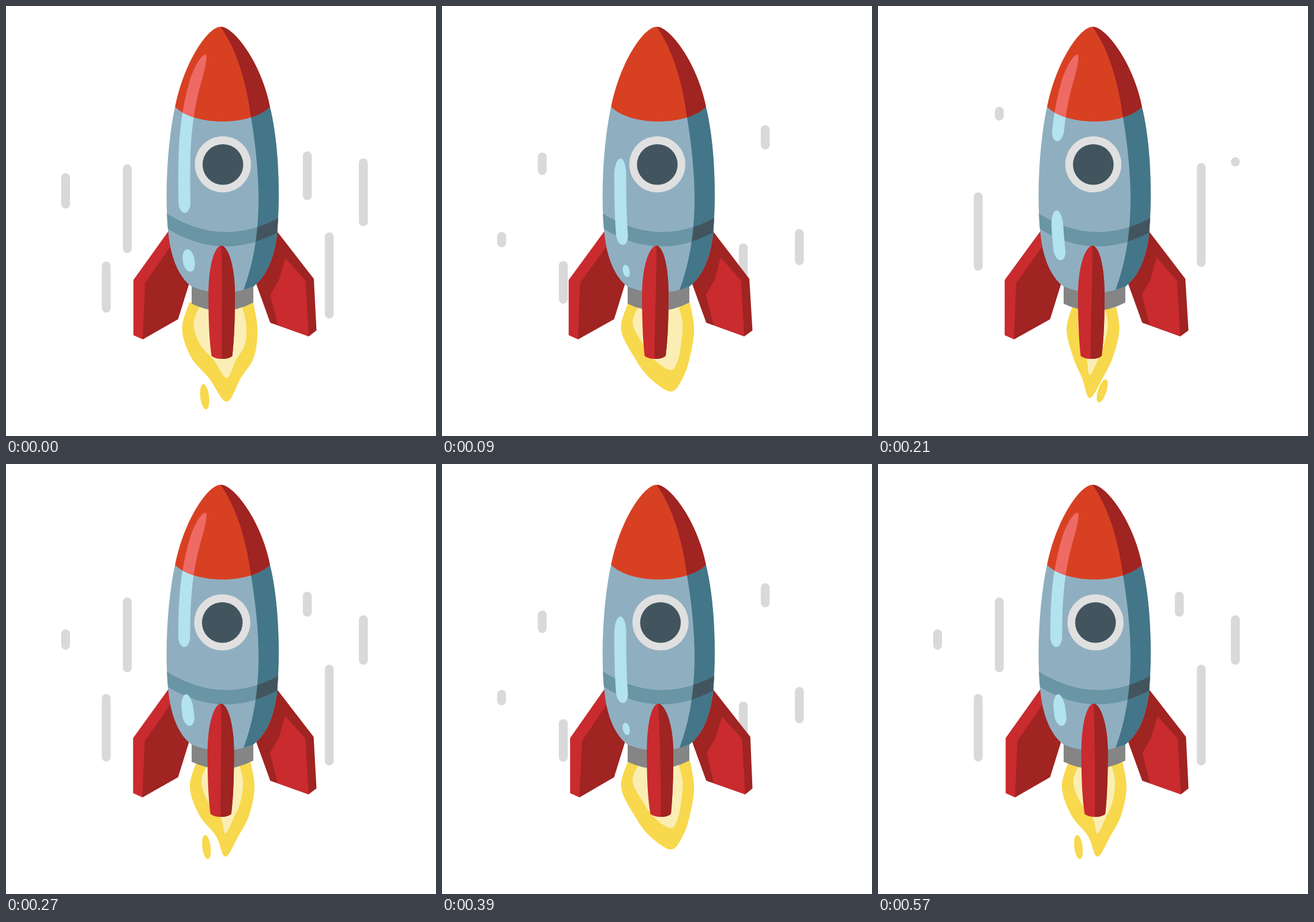
Animation of 725x725 px, one loop 0.6 s. Source, as an HTML page with a canvas:

```html
<!DOCTYPE html>
<html lang="en">
<head>
<meta charset="utf-8">
<title>Rocket</title>
<style>
html, body { margin: 0; width: 100%; height: 100%; overflow: hidden; background: #fff; }
canvas { display: block; }
</style>
</head>
<body>
<canvas id="stage" width="725" height="725"></canvas>
<script>
const ctx = document.getElementById('stage').getContext('2d');
const STEP = 30, CYCLE = 10;
const RED = '#c92b2f', DARK_RED = '#9f2422', SLATE = '#42555f', YELLOW = '#f8d84c';

// x, top, bottom, then the steps between which the head and the tail run down.
const streaks = [
  [100.5, 279, 415, 7.9, 13.8, 9.7, 13.7],
  [169, 247, 517, 2.2, 10, 3.85, 11.8],
  [204.5, 167, 502, 6.7, 12, 6.7, 14.1],
  [508, 208, 468, 8.35, 13, 8.5, 14],
  [545, 201, 527, 2.3, 10, 4, 12.9],
  [602.5, 255, 437, 6.8, 13, 9.8, 14]
];

// Reflection running down the hull: [step, y] of its two ends.
const shineTop = [[3.4, 82], [10, 82], [13, 257], [20, 410], [24, 445]];
const shineEnd = [[3.4, 83], [10, 349], [13, 403], [20, 448], [24, 460]];

const drops = [
  { born: 5, x: 386, y: 621, dx: -4, dy: 14, size: 30, peak: .3, tilt: .32 },
  { born: 8, x: 341, y: 633, dx: -3, dy: 13, size: 21.5, peak: 1.7, tilt: -.12 }
];

// Flame poses: step, tip height, then x along the edge from left to right, tip in the middle.
const edgeY = [545, 592, 627];
const poses = [
  [0, 667, 297, 312, 342, 372, 396, 418, 424],
  [3, 650, 302, 324, 350, 386, 406, 418, 425],
  [6, 662, 309, 322, 338, 349, 367, 392, 412],
  [7, 661, 318, 329, 344, 357, 379, 396, 407],
  [9, 662, 310, 326, 354, 370, 392, 410, 419]
];
poses.push([CYCLE, ...poses[0].slice(1)]);

const nose = new Path2D('M362 35C340 35 300 95 285 170C318 203 412 203 445 170C430 95 384 35 362 35Z');
const hull = new Path2D('M285 170C272 230 267 320 274 385C278 425 292 458 313 473Q365 494 417 473C440 455 452 425 457 385C463 320 460 230 445 170Z');
const shade = new Path2D('M362 35Q400 90 413 187C430 290 434 390 400 480H480V35Z');
const band = new Path2D('M265 346Q365 412 465 354V378Q365 436 265 371Z');
const nozzle = new Path2D('M313 465V502Q365 527 417 500V465Z');

const clamp = u => Math.min(1, Math.max(0, u));

function fill(path, color) {
  ctx.fillStyle = color;
  ctx.fill(path);
}

function within(path, draw) {
  ctx.save();
  ctx.clip(path);
  draw();
  ctx.restore();
}

function along(keys, t) {
  const i = Math.max(1, keys.findIndex(k => k[0] >= t));
  const a = keys[i - 1], b = keys[i], u = (t - a[0]) / (b[0] - a[0]);
  return a.slice(1).map((v, n) => v + (b[n + 1] - v) * u);
}

function disc(x, y, rx, ry, tilt, color) {
  ctx.beginPath();
  ctx.ellipse(x, y, rx, ry, tilt, 0, 2 * Math.PI);
  ctx.fillStyle = color;
  ctx.fill();
}

function polygon(color, ...pts) {
  fill(new Path2D('M' + pts.join('L') + 'Z'), color);
}

// Parts outlive one cycle, so each is drawn at its age in the overlapping ones.
const passes = step => [step, step + CYCLE, step + 2 * CYCLE];

function streak([x, top, bottom, headFrom, headTo, tailFrom, tailTo], t) {
  if (t < headFrom || t > tailTo) return;
  const head = top + (bottom - top) * (1 - (1 - clamp((t - headFrom) / (headTo - headFrom))) ** 1.4);
  const tail = top + (bottom - top) * clamp((t - tailFrom) / (tailTo - tailFrom)) ** 1.5;
  ctx.beginPath();
  ctx.moveTo(x, tail + 7.5);
  ctx.lineTo(x, Math.max(tail + 8, head - 7.5));
  ctx.stroke();
}

function drop({ born, x, y, dx, dy, size, peak, tilt }, step) {
  const age = (step - born + CYCLE) % CYCLE;
  if (age > 3) return;
  const h = size * (1 - ((age - peak) / 3) ** 2);
  disc(x + dx * age, y + dy * age, h * .35, h, tilt, YELLOW);
}

function spline(pts) {
  const path = new Path2D();
  path.moveTo(...pts[0]);
  for (let i = 0; i < pts.length - 1; i++) {
    const b = pts[i], c = pts[i + 1], a = pts[i - 1] || b, d = pts[i + 2] || c;
    path.bezierCurveTo(b[0] + (c[0] - a[0]) / 6, b[1] + (c[1] - a[1]) / 6,
      c[0] - (d[0] - b[0]) / 6, c[1] - (d[1] - b[1]) / 6, ...c);
  }
  return path;
}

function flame(step) {
  const [tipY, ...xs] = along(poses, step);
  const ys = [500, ...edgeY, tipY, ...edgeY.slice().reverse(), 500];
  const edge = [xs[0] + 12, ...xs, xs[6] - 7].map((x, i) => [x, ys[i]]);
  const core = edge.map(([x, y], i) => [x + 21 * Math.cos(Math.PI * i / 8), 500 + (y - 500) * .76]);
  fill(spline(edge), YELLOW);
  fill(spline(core), '#faeeb4');
}

// Soft-ended strip that follows the left curve of the hull.
function shineStrip(top, end) {
  const len = end - top, half = Math.min(10, len * .28), path = new Path2D();
  const topCap = Math.min(28 + .6 * Math.max(0, 110 - top), len / 2), endCap = Math.min(18, len / 2);
  const round = u => Math.sqrt(1 - (1 - clamp(u)) ** 2);
  const side = (y, sign) => {
    const d = y - 290, spine = 300.5 + Math.abs(d) ** 2.5 * (d < 0 ? 5.6e-5 : 3.3e-5);
    path.lineTo(spine + sign * half * Math.min(round((y - top) / topCap), round((end - y) / endCap)), y);
  };
  for (let y = top; y < end; y++) side(y, -1);
  for (let y = end; y > top; y--) side(y, 1);
  return path;
}

function sideFins(s) {
  const m = 1.5 * s, left = 214.8 + m, ridge = 234.5 + 2 * s;
  polygon(RED, [275, 378], [left, 462], [left, 555], [230.5 + m, 562], [290, 528], [309, 467], [320, 400]);
  polygon(DARK_RED, [284, 396], [ridge, 467], [230.5 + m, 562], [290, 528], [309, 467], [320, 400]);
  polygon(DARK_RED, [457, 380], [519 + s, 460], [523.5, 547], [510.5 + s, 557], [445.5, 534], [422, 469], [430, 400]);
  polygon(RED, [471 + m, 425 + m], [505 + s, 463], [510.5 + s, 557], [458, 538], [445.5 + s, 487], [460 + s, 462]);
}

function centerFin(s) {
  const tip = 363 + 2 * s, l = 341.3 + 5 * s, r = 386 + 5 * s, ridge = 363.8 + 6.5 * s;
  const bl = 346.5 + 6 * s, br = 381.5 + 5.5 * s;
  const right = `Q${br - 5} 595 ${br} 590C${r - 1} 560 ${r} 525 ${r} 485C${r} 440 ${tip + 12} 405 ${tip} 404`;
  fill(new Path2D(`M${tip} 404C${tip - 12} 405 ${l} 440 ${l} 485C${l} 525 ${l + 1} 560 ${bl} 590Q${bl + 6} 595 ${ridge} 595${right}Z`), RED);
  fill(new Path2D(`M${tip} 404C${tip + 2 + s} 450 ${ridge} 520 ${ridge} 595${right}Z`), DARK_RED);
}

function body(step) {
  const strips = passes(step).filter(t => t > 3.4 && t < 24)
    .map(t => shineStrip(...along(shineTop, t), ...along(shineEnd, t)));
  fill(hull, '#8fafc1');
  within(hull, () => {
    fill(shade, '#437688');
    fill(band, '#6995a5');
    within(shade, () => fill(band, SLATE));
    strips.forEach(s => fill(s, '#b2e3ee'));
  });
  fill(nose, '#d84022');
  within(nose, () => {
    fill(shade, DARK_RED);
    strips.forEach(s => fill(s, '#ee6a65'));
  });
}

function draw(now) {
  const tick = Math.floor(now / STEP) % (2 * CYCLE), step = tick % CYCLE;
  const sway = -Math.sin(Math.PI * tick / CYCLE), windowX = 365.7 + 3.3 * sway;
  ctx.fillStyle = '#fff';
  ctx.fillRect(0, 0, 725, 725);

  ctx.strokeStyle = '#d9d9d9';
  ctx.lineWidth = 15;
  ctx.lineCap = 'round';
  for (const s of streaks) passes(step).forEach(t => streak(s, t));

  flame(step);
  drops.forEach(d => drop(d, step));
  fill(nozzle, '#858585');
  sideFins(sway);
  body(step);
  disc(windowX, 267, 47.3, 47.3, 0, '#e0e0e0');
  disc(windowX, 267.3, 34.3, 34.3, 0, SLATE);
  centerFin(sway);
}

const start = performance.now();
function loop() {
  draw(performance.now() - start);
  requestAnimationFrame(loop);
}
loop();
</script>
</body>
</html>
```
